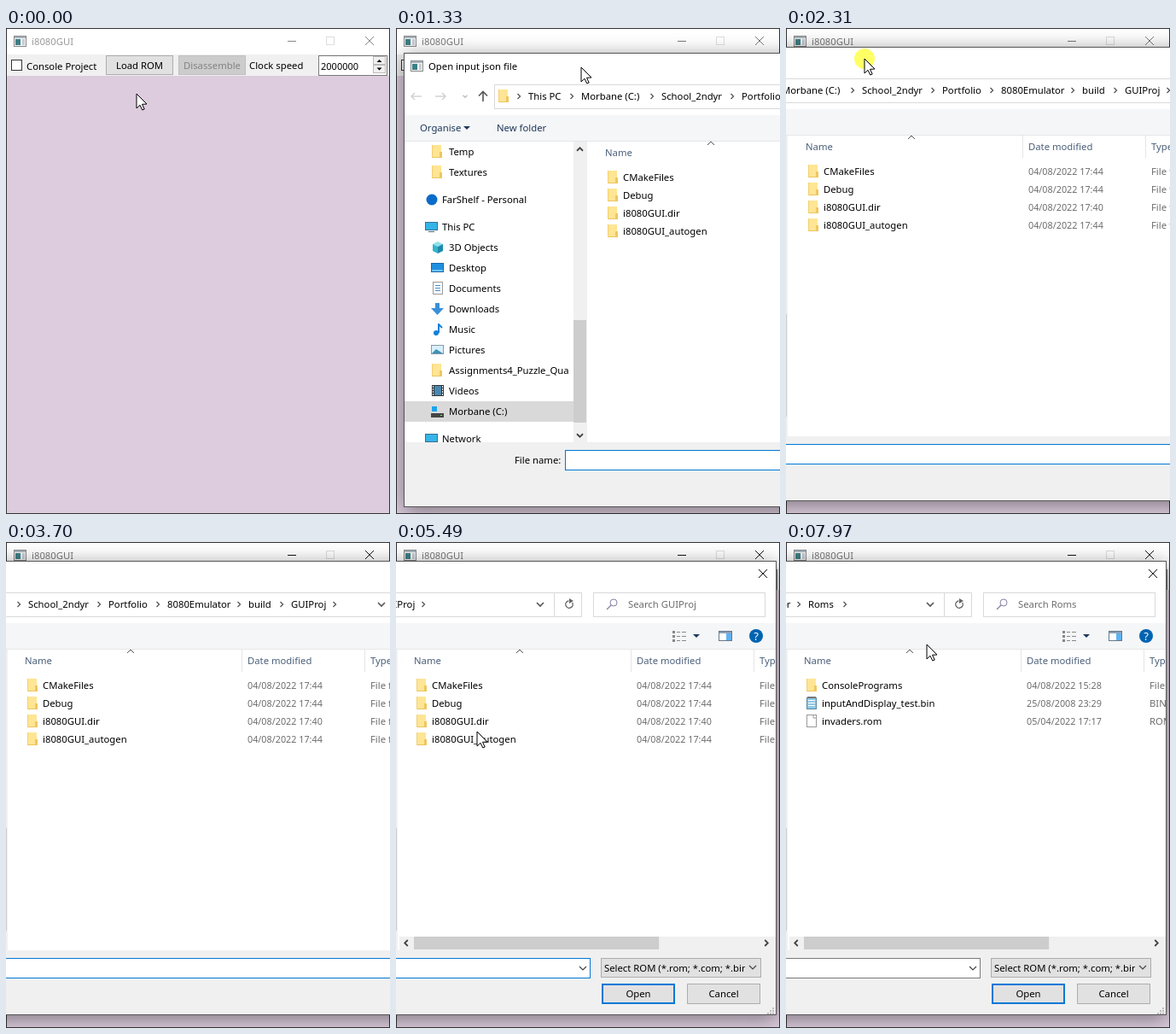
Recreate the animation shown at these times as an HTML page with a canvas. Size 450 px wide and 569 px high, loop 8 s.

```html
<!DOCTYPE html>
<html lang="en">
<head>
<meta charset="utf-8">
<title>i8080GUI</title>
<style>
html, body { margin: 0; width: 450px; height: 569px; overflow: hidden; }
canvas { display: block; }
</style>
</head>
<body>
<canvas id="stage" width="450" height="569"></canvas>
<script>
const c = document.getElementById('stage').getContext('2d');
const LOOP = 8000, LEFT = -213, TOP = 22, BOTTOM = 554, WIDE = 787;
const BLUE = '#0078d7', GREY = '#6d6d6d', PATH_START = -67;

const progress = (t, a, b) => Math.min(1, Math.max(0, (t - a) / (b - a)));
const smooth = p => p * p * (3 - 2 * p);
const mix = (a, b, p) => a + (b - a) * p;

// Smoothly interpolates rows of [time, ...values] in whole pixels.
function track(rows, t) {
  let i = 0;
  while (i < rows.length - 2 && t >= rows[i + 1][0]) i++;
  const [a, b] = [rows[i], rows[i + 1]];
  const p = smooth(progress(t, a[0], b[0]));
  return a.slice(1).map((v, k) => Math.round(mix(v, b[k + 1], p)));
}

function box(x, y, w, h, fill, border, weight = 1) {
  if (fill) { c.fillStyle = fill; c.fillRect(x, y, w, h); }
  if (border) {
    c.strokeStyle = border; c.lineWidth = weight;
    c.strokeRect(x + weight / 2, y + weight / 2, w - weight, h - weight);
  }
}
function text(s, x, y, color = '#000', size = 11.3, align = 'left') {
  c.font = `${size}px "Noto Sans", sans-serif`;
  c.textAlign = align; c.fillStyle = color;
  c.fillText(s, x, y);
}
function trace(points) {
  c.beginPath();
  points.forEach(([x, y], i) => i ? c.lineTo(x, y) : c.moveTo(x, y));
}
function line(points, color, weight = 1) {
  trace(points);
  c.strokeStyle = color; c.lineWidth = weight; c.stroke();
}
function poly(points, fill) { trace(points); c.closePath(); c.fillStyle = fill; c.fill(); }
function disc(x, y, r, fill) { c.beginPath(); c.arc(x, y, r, 0, 7); c.fillStyle = fill; c.fill(); }
function chevron(x, y, dir, color = '#555', s = 3, weight = 1.3) {
  const shape = {
    right: [[-s / 2, -s], [s / 2, 0], [-s / 2, s]],
    left: [[s / 2, -s], [-s / 2, 0], [s / 2, s]],
    up: [[-s, s / 2], [0, -s / 2], [s, s / 2]],
    down: [[-s, -s / 2], [0, s / 2], [s, -s / 2]]
  }[dir];
  line(shape.map(([a, b]) => [x + a, y + b]), color, weight);
}
const triangle = (x, y, s, color = '#000') => poly([[x - Math.abs(s), y - s / 2], [x + Math.abs(s), y - s / 2], [x, y + s / 2]], color);
function cross(x, y, color) {
  line([[x - 5, y - 5], [x + 5, y + 5]], color);
  line([[x + 5, y - 5], [x - 5, y + 5]], color);
}
function clipped(x, y, w, h, draw) {
  c.save(); c.beginPath(); c.rect(x, y, w, h); c.clip(); draw(); c.restore();
}
// Casts a shadow around a rectangle, leaving its inside untouched.
function shadow(x, y, w, h) {
  c.save();
  c.beginPath(); c.rect(-2000, -2000, 4000, 4000); c.rect(x, y, w, h); c.clip('evenodd');
  c.shadowColor = 'rgba(0,0,0,.45)'; c.shadowBlur = 22; c.shadowOffsetY = 4;
  box(x, y, w, h, '#000');
  c.restore();
}
function button(label, x, y, w, h, border = '#adadad', weight = 1, fill = '#e1e1e1', color = '#000') {
  box(x, y, w, h, fill, border, weight);
  text(label, x + w / 2, y + h / 2 + 4, color, 11.3, 'center');
}

// Icons are drawn from their top left corner.
const monitor = (x, y) => { box(x, y + 2, 15, 10, '#35b4e8', '#3d6f8c'); box(x + 4, y + 13, 7, 1, '#3d6f8c'); };
const page = (x, y) => { box(x + 2, y, 12, 15, '#fff', '#999'); };
const icons = {
  app(x, y) {
    box(x, y, 15, 13, '#f4f4f4', '#888'); box(x + 1, y + 1, 13, 2, '#a9b4bd');
    box(x + 2, y + 4, 6, 7, '#3c7f87'); box(x + 10, y + 4, 3, 7, '#c9ced3');
  },
  folder(x, y) {
    box(x + 1, y, 11, 15, '#ffe594'); box(x + 10, y + 8, 3, 7, '#efc75e');
    box(x + 1, y + 14, 9, 1, '#edc45e'); box(x + 1, y, 1, 15, '#f2cf73');
  },
  cloud(x, y) { disc(x + 8, y + 8, 6.5, '#0a6cc9'); },
  monitor,
  cube(x, y) {
    poly([[x + 8, y + 1], [x + 14, y + 4], [x + 8, y + 7], [x + 2, y + 4]], '#8fe0ee');
    poly([[x + 2, y + 4], [x + 8, y + 7], [x + 8, y + 15], [x + 2, y + 12]], '#36b3cc');
    poly([[x + 14, y + 4], [x + 8, y + 7], [x + 8, y + 15], [x + 14, y + 12]], '#1c8ca8');
  },
  desktop(x, y) { box(x, y + 2, 15, 11, '#1e90e0', '#1767a8'); box(x + 1, y + 10, 13, 2, '#6fc3f5'); },
  page(x, y) { page(x, y); for (let i = 4; i < 13; i += 3) box(x + 5, y + i, 6, 1, '#4a90c8'); },
  down(x, y) { poly([[5, 1], [10, 1], [10, 7], [15, 7], [7.5, 15], [0, 7], [5, 7]].map(([a, b]) => [x + a, y + b]), '#3a8fd8'); },
  music(x, y) { disc(x + 6, y + 12, 3, '#1380d8'); box(x + 8, y + 1, 2, 11, '#1380d8'); line([[x + 9, y + 2], [x + 13, y + 6]], '#1380d8', 2); },
  picture(x, y) { box(x, y + 2, 15, 11, '#d8f0ff', '#8a9aa5'); poly([[x + 1, y + 12], [x + 6, y + 7], [x + 14, y + 12]], '#3d92b5'); },
  film(x, y) {
    box(x + 1, y + 1, 14, 13, '#333'); box(x + 4, y + 2, 8, 11, '#4a87b0');
    for (let i = 2; i < 13; i += 3) { box(x + 2, y + i, 1, 2, '#fff'); box(x + 13, y + i, 1, 2, '#fff'); }
  },
  drive(x, y) { box(x + 1, y + 2, 6, 6, '#1ca3ec'); box(x, y + 10, 15, 5, '#444'); box(x + 11, y + 12, 2, 1, '#6f6'); },
  blank(x, y) { page(x - 1, y); line([[x + 9, y], [x + 9, y + 4], [x + 13, y + 4]], '#999'); },
  notes(x, y) { box(x + 1, y + 1, 12, 14, '#8cc8e4', '#5a8ba3'); for (let i = 4; i < 13; i += 3) box(x + 3, y + i, 8, 1, '#fff'); box(x + 2, y, 10, 2, '#777'); }
};

const navItems = [
  ['folder', 'Temp', 138], ['folder', 'Textures', 162], ['cloud', 'FarShelf - Personal', 194, 1],
  ['monitor', 'This PC', 226, 1], ['cube', '3D Objects', 250], ['desktop', 'Desktop', 274],
  ['page', 'Documents', 298], ['down', 'Downloads', 322], ['music', 'Music', 346],
  ['picture', 'Pictures', 370], ['folder', 'Assignments4_Puzzle_Qua', 394], ['film', 'Videos', 418],
  ['drive', 'Morbane (C:)', 442], ['monitor', 'Network', 474, 1]
];
// Breadcrumbs as [label, advance].
const parents = [['This PC', 62], ['Morbane (C:)', 94], ['School_2ndyr', 94], ['Portfolio', 69], ['8080Emulator', 95]];
const views = {
  GUIProj: {
    path: [...parents, ['build', 50], ['GUIProj', 62]],
    rows: [
      ['folder', 'CMakeFiles', '04/08/2022 17:44', 'File folder'], ['folder', 'Debug', '04/08/2022 17:44', 'File folder'],
      ['folder', 'i8080GUI.dir', '04/08/2022 17:40', 'File folder'], ['folder', 'i8080GUI_autogen', '04/08/2022 17:44', 'File folder']
    ]
  },
  Roms: {
    path: [...parents, ['Roms', 54]],
    rows: [
      ['folder', 'ConsolePrograms', '04/08/2022 15:28', 'File folder'], ['notes', 'inputAndDisplay_test.bin', '25/08/2008 23:29', 'BIN File'],
      ['blank', 'invaders.rom', '05/04/2022 17:17', 'ROM File']
    ]
  }
};

function mainWindow(t) {
  const control = t < 840 ? '#888' : t < 3610 ? '#777' : '#111';
  box(0, 0, 450, 569, '#dcccdd');
  box(0, 0, 450, 31, '#fff');
  box(0, 31, 450, 25, '#f0f0f0');
  icons.app(9, 9);
  text('i8080GUI', 30, 20, t < 840 ? '#999' : '#777');
  box(330, 15, 10, 1, control);
  box(375, 10, 10, 10, null, '#ddd');
  cross(426, 15, control);
  box(6, 37, 13, 13, '#fff', '#333');
  text('Console Project', 24, 49);
  const hover = t > 380 && t < 1200;
  button('Load ROM', 117, 32, 79, 23, hover ? BLUE : '#adadad', 1, hover ? '#e5f1fb' : '#e1e1e1');
  button('Disassemble', 202, 32, 79, 23, '#bfbfbf', 1, '#ccc', '#838383');
  text('Clock speed', 285, 48);
  box(366, 32, 81, 24, '#fff', '#7a7a7a');
  text('2000000', 369, 49, '#000', 11);
  for (const y of [33, 43]) box(430, y, 15, 10, '#f0f0f0', '#bbb');
  triangle(437.5, 38.5, -3);
  triangle(437.5, 48, 3);
  box(0, 0, 450, 569, null, '#333');
}

function addressBar(R, shift, name, path) {
  for (const [x, s] of [[-198, -1], [-170, 1]]) {
    line([[x - 6, 73], [x + 6, 73]], '#ccc', 1.3);
    chevron(x + s * 4, 73, s > 0 ? 'right' : 'left', '#ccc', 4);
  }
  chevron(-141, 73, 'down', '#bbb', 2.5);
  line([[-120, 68], [-120, 79]], '#555', 1.6);
  chevron(-120, 70, 'up', '#555', 5, 1.6);
  box(-107, 59, R - 228 + 107, 29, '#fff', '#d9d9d9');
  icons.folder(-103, 65);
  // Leading crumbs are dropped until the rest fits.
  const total = items => items.reduce((sum, item) => sum + item[1], 0);
  while (PATH_START + total(path) - 4 + 36 > R - 285) path = path.slice(1);
  let x = PATH_START + shift;
  for (const [label, advance] of path) {
    chevron(x - 11, 73, 'right');
    text(label, x, 77);
    x += advance;
  }
  chevron(x - 11, 73, 'right');
  chevron(R - 277, 73, 'down', '#555', 4, 1.6);
  box(R - 261, 60, 1, 27, '#d9d9d9');
  c.beginPath(); c.arc(R - 243, 73, 4.2, -.5, 4.6); c.strokeStyle = '#666'; c.lineWidth = 1.4; c.stroke();
  poly([[R - 243, 66], [R - 238, 69], [R - 243, 72]], '#666');
  box(R - 215, 59, 202, 29, '#fff', '#d9d9d9');
  c.beginPath(); c.arc(R - 191, 71, 4, 0, 7); c.strokeStyle = '#8581a3'; c.lineWidth = 1; c.stroke();
  line([[R - 194, 74], [R - 199, 79]], '#8581a3', 1.3);
  text('Search ' + name, R - 174, 77, GREY);
}

function toolbar(R) {
  box(LEFT + 1, 95, R - LEFT - 1, 31, '#f5f6f7');
  box(LEFT + 1, 125, R - LEFT - 1, 1, '#e4e6e8');
  text('Organise', -194, 114, '#1e395b');
  triangle(-139, 110, 4, '#1e395b');
  text('New folder', -104, 114, '#1e395b');
  for (let i = 0; i < 3; i++) {
    box(R - 122, 104 + i * 5, 3, 3, '#888');
    box(R - 117, 105 + i * 5, 4, 1, '#888');
    box(R - 111, 105 + i * 5, 5, 1, '#888');
  }
  triangle(R - 94, 110, 4, '#1e395b');
  box(R - 68, 104, 16, 12, '#fff', '#66788a');
  box(R - 59, 105, 6, 10, '#5fb2f2');
  box(R - 67, 105, 14, 2, '#8ba0b5');
  disc(R - 24, 110, 8, '#0063b1');
  text('?', R - 24, 115, '#fff', 13, 'center');
}

function navPane() {
  clipped(LEFT + 1, 126, -15 - LEFT, 352, () => {
    box(LEFT + 1, 430, 198, 24, '#d9d9d9');
    for (const [icon, label, y, top] of navItems) {
      icons[icon](top ? -188 : -181, y - 8);
      text(label, top ? -168 : -160, y + 4);
    }
  });
}

function navScrollbar() {
  box(-14, 126, 16, 352, '#f0f0f0');
  box(-14, 335, 15, 120, '#cdcdcd');
  chevron(-6.5, 135, 'up', '#444', 3.5, 1.8);
  chevron(-6.5, 470, 'down', '#444', 3.5, 1.8);
}

function fileList(R, shift, rows) {
  clipped(4, 126, R - 5, 352, () => {
    c.translate(shift, 0);
    text('Name', 23, 143, '#4c607a');
    text('Date modified', 284, 143, '#4c607a');
    text('Type', 428, 143, '#4c607a');
    for (const x of [277, 421]) box(x, 126, 1, 26, '#e5e5e5');
    chevron(147, 128, 'up', '#555', 4, 1);
    rows.forEach(([icon, name, date, type], i) => {
      const y = 168 + i * 21;
      icons[icon](25, y - 8);
      text(name, 44, y + 4);
      text(date, 284, y + 4, GREY, 10.8);
      text(type, 428, y + 4, GREY);
    });
  });
  if (R < 632) {
    box(4, 462, R - 5, 16, '#f0f0f0');
    box(21, 462, (R - 38) * (R - 4) / 628, 15, '#cdcdcd');
    chevron(12, 469.5, 'left', '#444', 3.5, 1.8);
    chevron(R - 12, 469.5, 'right', '#444', 3.5, 1.8);
  }
}

function footer(R, focused) {
  text('File name:', -83, 503);
  box(-24, 487, R - 218 + 24, 24, '#fff', focused ? BLUE : '#7a7a7a');
  chevron(R - 227, 499, 'down', '#444', 4, 1.2);
  box(R - 206, 487, 188, 23, '#e1e1e1', '#adadad');
  clipped(R - 204, 487, 167, 23, () => text('Select ROM (*.rom; *.com; *.bin)', R - 202, 503));
  chevron(R - 28, 498, 'down', '#444', 4, 1.2);
  button('Open', R - 205, 517, 86, 24, BLUE, 2);
  button('Cancel', R - 105, 517, 86, 24);
  for (let i = 0; i < 3; i++)
    for (let j = 0; j <= i; j++) box(R - 5 - j * 3, 545 + i * 3, 2, 2, '#bbb');
}

function dialog(t, R, drag) {
  const opening = progress(t, 900, 1012);
  if (!opening) return;
  const bare = t < 1060, width = R - LEFT, height = BOTTOM - TOP, zoom = .95 + .05 * opening;
  c.save();
  c.globalAlpha = opening;
  c.translate(Math.round(mix(222, 0, drag)), Math.round(mix(7, 0, drag)));
  if (zoom < 1) {
    const x = LEFT + width / 2, y = TOP + height / 2;
    c.translate(x, y); c.scale(zoom, zoom); c.translate(-x, -y);
  }
  shadow(LEFT, TOP, width, height);
  box(LEFT, TOP, width, 478 - TOP, '#fff');
  box(LEFT, 478, width, BOTTOM - 478, '#f0f0f0');
  icons.app(-205, 31);
  text('Open input json file', -184, 42);
  navScrollbar();
  if (bare) {
    box(-83, 491, 54, 15, '#fff');
    box(-24, 487, R - 194, 24, '#fff');
  } else {
    const name = t < 6800 ? 'GUIProj' : 'Roms', view = views[name];
    const shift = Math.round(-2 * progress(R, WIDE, 600));
    cross(R - 16, 37, '#111');
    addressBar(R, shift, name, view.path);
    toolbar(R);
    navPane();
    fileList(R, shift, view.rows);
    footer(R, t < 6800);
  }
  box(LEFT, TOP, width, height, null, '#555');
  c.restore();
}

const arrow = [[0, 0], [0, 17], [4, 13.3], [6.8, 19], [9.2, 18], [6.5, 12.3], [12, 12]];
const resizer = [[-9, 0], [-4, -5], [-4, -2], [4, -2], [4, -5], [9, 0], [4, 5], [4, 2], [-4, 2], [-4, 5]];
const cursorPath = [
  [40, 153, 77], [450, 147, 46], [840, 145, 48], [1060, 145, 48], [1640, 305, 43], [1670, 305, 43]
];
const laterPath = [
  [2690, 92, 36], [2850, 480, 460], [5100, 480, 460], [5101, 442, 257], [5690, -30, 210], [7500, -20, 190], [7970, 165, 120]
];

function cursor(t, R, drag) {
  const resizing = t >= 3610 && t < 5100;
  const pressed = t >= 840 && t < 940 || t >= 1670 && t < 2690 || resizing;
  const [x, y] = resizing ? [R - 4, 257]
    : t < 1670 ? track(cursorPath, t)
    : t < 2690 ? [Math.round(mix(305, 92, drag)), Math.round(mix(43, 36, drag))]
    : track(laterPath, t);
  if (pressed) disc(x, y, 12, 'rgba(255,255,0,.6)');
  const shape = (resizing ? resizer : arrow).map(([a, b]) => [x + a, y + b]);
  poly(shape, resizing ? '#fff8a0' : '#fff');
  line([...shape, shape[0]], '#000');
}

function frame() {
  const t = performance.now() % LOOP;
  const [R] = track([[3610, WIDE], [3830, 600], [4280, 600], [4680, 450], [4910, 450], [5100, 446]], t);
  const drag = smooth(progress(t, 1670, 2310) ** 1.4);
  mainWindow(t);
  dialog(t, R, drag);
  cursor(t, R, drag);
  requestAnimationFrame(frame);
}
frame();
</script>
</body>
</html>
```
